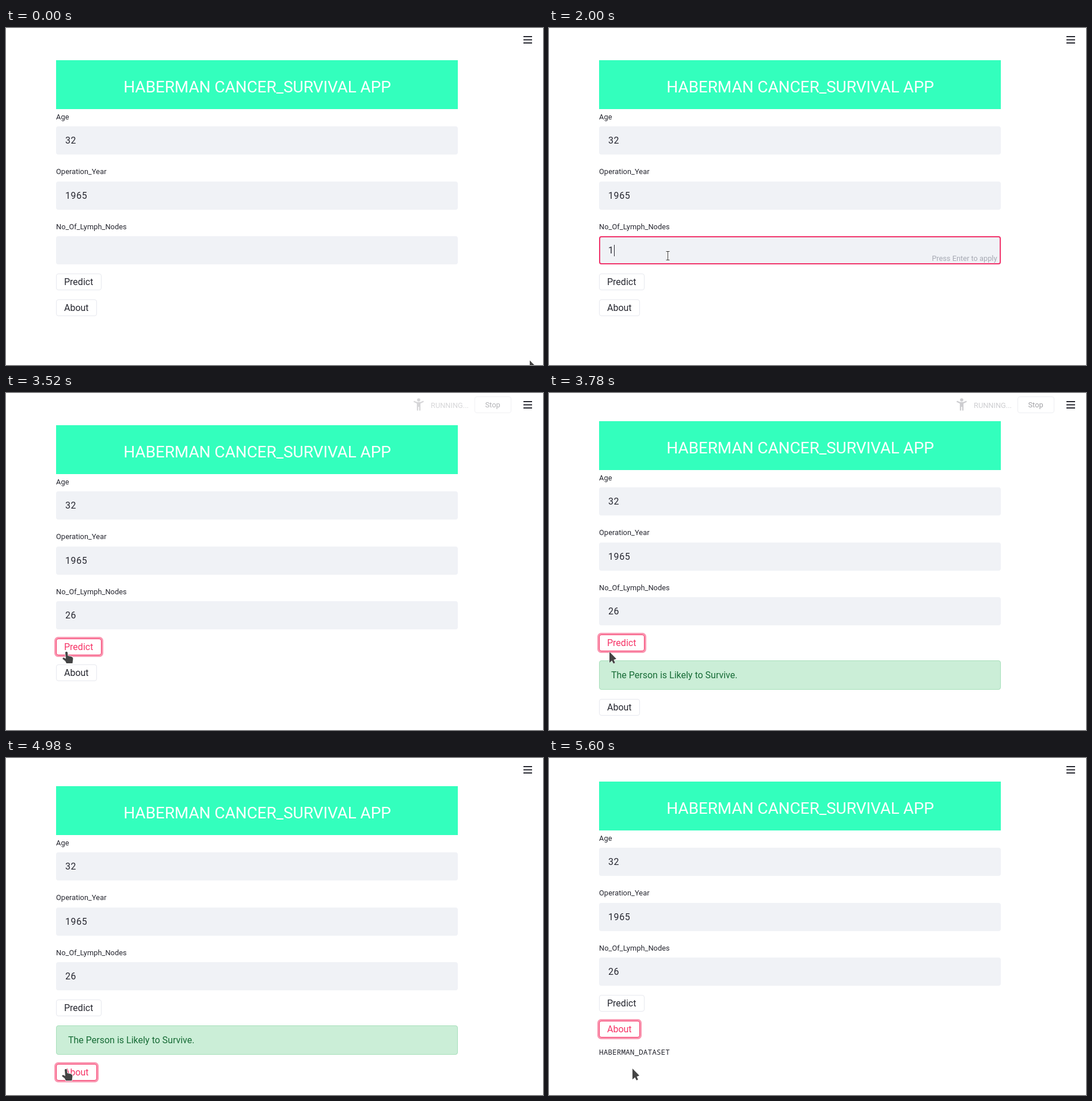
Animation, 933 px wide and 586 px high, one loop 5.62 s. Source, as an HTML page:

```html
<!DOCTYPE html>
<html lang="en">
<head>
<meta charset="utf-8">
<title>Survival form</title>
<style>
  html, body { margin: 0; width: 100%; height: 100%; overflow: hidden; background: #fff; }
  svg { display: block; width: 933px; height: 586px; }
  text { font-family: Roboto, "Noto Sans", sans-serif; font-size: 16px; fill: #262730; white-space: pre; }
  .title { font-size: 28px; fill: #fff; text-anchor: middle; letter-spacing: -.1px; }
  .small { font-size: 12.8px; }
  .label { letter-spacing: .07px; }
  .digits { letter-spacing: .6px; }
  .mono { font-family: "Noto Sans Mono", "DejaVu Sans Mono", monospace; font-size: 12.8px; }
  .field { fill: #f0f2f6; }
  .box { fill: #fff; stroke: #e6e8ee; }
  .ring { fill: #f63366; fill-opacity: .5; }
  .hot .box { stroke: #f63366; }
  .hot text { fill: #f63366; }
</style>
</head>
<body>
<svg viewBox="0 0 933 586">
  <g id="page">
    <rect x="87" y="56" width="698" height="85" fill="#33ffbd"/>
    <text class="title" x="436.5" y="112">HABERMAN CANCER_SURVIVAL APP</text>
    <g id="fields"></g>
    <rect id="focus" x="88" y="363" width="696" height="47" rx="3" fill="none" stroke="#f0326a" stroke-width="2"/>
    <text class="digits" id="nodes" x="103" y="392"></text>
    <rect id="caret" y="377" width="1" height="20" fill="#262730"/>
    <text class="small" id="hint" x="778.5" y="405" text-anchor="end" style="fill:#a6a9b3">Press Enter to apply</text>
    <g id="result">
      <rect x="87.5" y="472.5" width="697" height="50" rx="3.5" fill="#cbeed7" stroke="#a6dfba"/>
      <text x="108" y="503" style="fill:#176c36">The Person is Likely to Survive.</text>
    </g>
    <g id="predict"></g>
    <g id="about"></g>
    <text class="mono" id="dataset" x="87" y="531">HABERMAN_DATASET</text>
  </g>

  <g id="running">
    <circle cx="717" cy="12" r="2.8" fill="#8c8d93"/>
    <path d="M708.5 14.5 L714 17 H720 L725.5 14.5 M715 18 V30.5 M719 18 V30.5" fill="none" stroke="#8c8d93" stroke-width="2.3"/>
    <rect x="714" y="16" width="6" height="8" fill="#8c8d93"/>
    <text class="small" x="738" y="26" style="fill:#8c8d93">RUNNING...</text>
    <rect x="814.5" y="6.5" width="63" height="28" rx="3.5" fill="#fff" stroke="#d5d7df"/>
    <text class="small" x="832.5" y="25">Stop</text>
  </g>

  <path d="M899 15 H914 M899 20.5 H914 M899 26 H914" stroke="#262730" stroke-width="2"/>

  <g id="pointer">
    <path id="arrow" d="M0 0 V19 L4.3 15.2 L7 20.5 L9.8 19.2 L7.4 14 L12 12.2 Z"
      fill="#444" stroke="#fff" paint-order="stroke"/>
    <g id="beam" fill="none" transform="translate(.5 0)">
      <path d="M-3 -8 H3 M0 -8 V8 M-3 8 H3" stroke="#fff" stroke-width="3"/>
      <path d="M-3 -7.5 H3 M0 -7 V7 M-3 7.5 H3" stroke="#333"/>
    </g>
    <path id="hand" d="M-2 1 Q0 -1.5 2 1 L2.5 7 L9 8.5 Q11.5 9.5 11.5 12 L10.5 20 H0 L-2 16 L-6.5 12.5 Q-7 10 -4.5 10.3 L-1 12 Z"
      fill="#444" stroke="#fff" stroke-width="1.5" paint-order="stroke"/>
  </g>
</svg>
<script>
  const LOOP = 5620, BLINK = 360;
  const CLICK_FIELD = 560, CLICK_PREDICT = 3420, RESULT = 3620, CLICK_ABOUT = 4760, DATASET = 5060;

  const KEYS = [[CLICK_FIELD, ""], [2000, "1"], [2360, ""], [2420, "2"], [2580, "26"]];

  // Pointer moves: start, end, target x, target y.
  const MOVES = [
    [0, 540, 207, 394], [1960, 2000, 206, 396], [2980, 3300, 105, 450], [4080, 4300, 246, 470],
    [4300, 4560, 53, 527], [4560, 4740, 104, 541], [4980, 5320, 146, 540], [5540, 5600, 145, 540]
  ];

  const $ = id => document.getElementById(id);
  const show = (id, on) => { $(id).style.display = on ? "" : "none"; };
  const ramp = (t, from, to) => Math.min(1, Math.max(0, (t - from) / (to - from)));
  const ease = p => p * p * (3 - 2 * p);
  const pulse = (t, on, off, fade) => ramp(t, on, on + fade) - ramp(t, off, off + fade);
  const inside = (x, y, top, w, h) => x >= 87 && x < 87 + w && y >= top && y < top + h;
  const fieldTop = i => Math.round(171 + 95.6 * i);

  $("fields").innerHTML = [["Age", "32"], ["Operation_Year", "1965"], ["No_Of_Lymph_Nodes", ""]]
    .map(([label, value], i) => `
      <text class="small label" x="87" y="${Math.round(159 + 95.4 * i)}">${label}</text>
      <rect class="field" x="87" y="${fieldTop(i)}" width="698" height="49" rx="4"/>
      <text class="digits" x="103" y="${fieldTop(i) + 30}">${value}</text>`).join("");

  function makeButton(id, label, top, width) {
    $(id).innerHTML = `
      <rect class="ring" x="84" y="${top - 3}" width="${width + 6}" height="35" rx="6.5"/>
      <rect class="box" x="87.5" y="${top + .5}" width="${width - 1}" height="28" rx="3.5"/>
      <text x="101" y="${top + 20}">${label}</text>`;
  }
  makeButton("predict", "Predict", 427, 79);
  makeButton("about", "About", 472, 71);

  function setButton(id, hover, focused) {
    $(id).classList.toggle("hot", hover || focused);
    $(id).querySelector(".ring").style.display = focused ? "" : "none";
  }

  function pointerAt(t) {
    return MOVES.reduce(([x, y], [from, to, toX, toY]) => {
      const p = ease(ramp(t, from, to));
      return [x + (toX - x) * p, y + (toY - y) * p];
    }, [910, 578]).map(Math.round);
  }

  function drawInput(t) {
    const [keyTime, value] = KEYS.filter(k => k[0] <= t).pop() || KEYS[0];
    const active = t >= CLICK_FIELD && t < CLICK_PREDICT;
    const lit = Math.floor((t - keyTime) / BLINK) % 2 === 0;
    $("nodes").textContent = value;
    $("caret").setAttribute("x", 103 + Math.round(value.length * 9.6));
    show("caret", active && lit);
    show("hint", active && t >= 2000);
    $("focus").style.opacity = pulse(t, CLICK_FIELD - 20, CLICK_PREDICT - 140, 220);
  }

  function draw(t) {
    const scroll = Math.round(7 * ramp(t, RESULT, RESULT + 40)
      + 16 * ramp(t, DATASET, DATASET + 80) - 8 * ramp(t, 5540, 5600));
    const hasResult = t >= RESULT && t < DATASET;
    const shift = hasResult ? 67 : 0;

    $("page").setAttribute("transform", `translate(0 ${-scroll})`);
    $("about").setAttribute("transform", `translate(0 ${shift})`);
    show("result", hasResult);
    show("dataset", t >= DATASET);
    drawInput(t);
    $("running").style.opacity = .7 * (pulse(t, 3440, 3720, 160) + pulse(t, 5000, 5160, 120));

    const [x, y] = pointerAt(t), pageY = y + scroll;
    const onPredict = inside(x, pageY, 427, 79, 29);
    const onAbout = inside(x, pageY, 472 + shift, 71, 29);
    const onButton = onPredict || onAbout;
    const onField = [0, 1, 2].some(i => inside(x, pageY, fieldTop(i), 698, 49));
    setButton("predict", onPredict, t >= CLICK_PREDICT && t < CLICK_ABOUT);
    setButton("about", onAbout, t >= CLICK_ABOUT);

    $("pointer").setAttribute("transform", `translate(${x} ${y})`);
    show("hand", onButton);
    show("beam", onField);
    show("arrow", !onButton && !onField);
  }

  const start = performance.now();
  function tick() {
    draw((performance.now() - start) % LOOP);
    requestAnimationFrame(tick);
  }
  tick();
</script>
</body>
</html>
```
